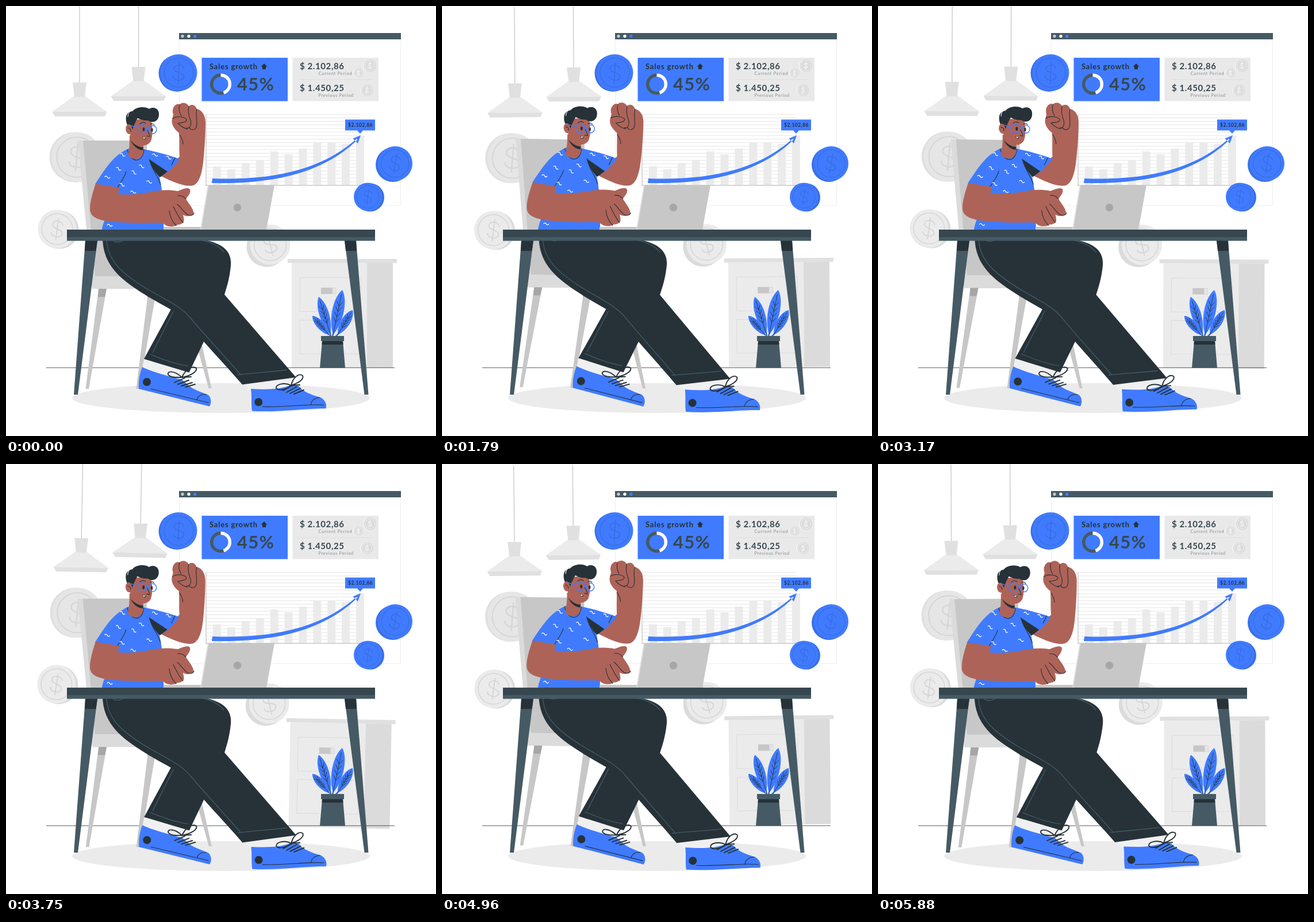
Recreate the animation shown at these times as an HTML page. Size 748 by 748 pixels, loop 5930 ms.

```html
<!DOCTYPE html>
<html lang="en">
<head>
<meta charset="utf-8">
<title>Sales growth</title>
<style>
html, body { margin: 0; width: 100%; height: 100%; overflow: hidden; background: #fff; }
svg { display: block; width: 100vw; height: 100vh; }
text { font-family: Lato, "Open Sans", sans-serif; font-weight: 700; fill: #263238; }
.blue { fill: #407bff; }
.dark { fill: #263238; }
.slate { fill: #455a64; }
.skin { fill: #ae6358; }
.pale { fill: #ebebeb; }
.light { fill: #e0e0e0; }
.mid { fill: #dbdbdb; }
.grey { fill: #c7c7c7; }
.line { fill: none; stroke: #263238; stroke-width: 1.1; stroke-linecap: round; stroke-linejoin: round; }
.seam { fill: none; stroke: #455a64; stroke-width: 1.3; stroke-linecap: round; }
.lace { fill: none; stroke: #263238; stroke-width: 1.9; stroke-linecap: round; stroke-linejoin: round; }
.sum { font-size: 15px; letter-spacing: .6px; fill: #37474f; }
.small { font-size: 7.5px; font-weight: 400; fill: #8b8b8b; }
</style>
</head>
<body>
<svg viewBox="0 0 748 748" xmlns="http://www.w3.org/2000/svg">
  <g id="room">
    <g id="lamps"></g>
    <g id="greyCoins"></g>
    <g id="cabinet">
      <path class="pale" d="M497 447H628V629.5H497Z"/>
      <path class="mid" d="M628 447H673V629.5H628Z"/>
      <path class="light" d="M490 440H680V447H490Z"/>
      <path d="M511 472.500H617V531.500H511ZM511 546.500H617V605H511Z" fill="none" stroke="#dbdbdb"/>
      <path class="grey" d="M548 490H568V501H548Z"/>
      <path d="M568 490.500H574V500.500H568Z" fill="#e6e6e6" stroke="#d5d5d5"/>
    </g>
  </g>

  <path d="M70 629.200H676" stroke="#263238" stroke-width=".8"/>
  <ellipse class="pale" cx="374" cy="682" rx="259" ry="26"/>

  <g id="board">
    <path d="M301.500 58V347H686.500V58" fill="none" stroke="#ebebeb" stroke-width=".9"/>
    <path class="slate" d="M301 47H687V58H301Z"/>
    <circle class="grey" cx="307" cy="52.500" r="2.700"/>
    <circle fill="#fff" cx="318" cy="52.500" r="2.700"/>
    <circle class="blue" cx="328.700" cy="52.500" r="2.700"/>
    <path class="blue" d="M340.500 90H490V165.500H340.500Z"/>
    <text x="354" y="110" font-size="13" letter-spacing=".8">Sales growth</text>
    <path class="dark" d="M449 100L454.500 105.500H452V110H446V105.500H443.500Z"/>
    <g fill="none" stroke-width="5.500">
      <circle cx="373.500" cy="136" r="15.800" stroke="#455a64"/>
      <path d="M373.500 120.200A15.800 15.800 0 0 1 378.500 151" stroke="#fff"/>
    </g>
    <text x="402" y="147" font-size="31" letter-spacing="1.300" style="fill:#37474f">45%</text>
    <path fill="#e9e9e9" d="M498.500 90H648V165.500H498.500Z"/>
    <path d="M511 128H637" stroke="#d8d8d8" stroke-width=".8"/>
    <text class="sum" x="511" y="109.500">$ 2.102,86</text>
    <text class="sum" x="511" y="148">$ 1.450,25</text>
    <text class="small" x="543.500" y="120" letter-spacing=".75">Current Period</text>
    <text class="small" x="543.500" y="157.500" letter-spacing=".65">Previous Period</text>
    <g id="miniCoins"></g>
    <g id="chart"></g>
    <path d="M348 188V312H626" fill="none" stroke="#c7c7c7" stroke-width="1.300"/>
    <path class="blue" d="M359 300C462 304 548 286 610 231L611.500 232.500C552 291 464 310 358 308ZM617 225L603.500 230.500L612 239Z"/>
    <path class="blue" d="M590 197.500H642V216.500H621L616 222L611 216.500H590Z"/>
    <text x="595" y="210" font-size="8.500" letter-spacing=".5">$2.102,86</text>
  </g>
  <g id="blueCoins"></g>

  <g id="person">
    <g id="chair">
      <path class="mid" d="M125 234H230V492H150Z"/>
      <path class="grey" d="M134 234H245V470H155Z"/>
      <path class="mid" d="M148 470H290V492H150Z"/>
      <path class="grey" d="M161 492H175L144 666H138.500ZM248 492H262L232 666H226.500ZM318 540H330L357.500 665H352.500Z"/>
      <path fill="#a6a6a6" d="M161 492H175L172 506H160ZM248 492H262L260 507H246Z"/>
    </g>

    <g id="shoes">
      <path fill="#f0f0f0" d="M240 614L318 637L312 660L236 636ZM411 656L498 645L502 664L426 670Z"/>
      <path class="blue" d="M237 628C232 640 230 655 231 666L354 696.500C358 690 357 680 351 676C338 671 326 667 319 661L306 650C288 645 255 637 237 628Z"/>
      <path class="blue" d="M426 666C428 680 426 692 428 704.500C470 707 520 700 556.500 700C559 692 554 684 547 681C530 676 517 671 509 661L497 659C475 668 450 667 426 666Z"/>
      <circle class="dark" cx="245" cy="654" r="7"/>
      <circle class="dark" cx="439.300" cy="689" r="7"/>
      <path class="line" d="M252 666L352 690M332 685C334 678 340 675 348 676M446 697C490 698 520 692 553 694M530 694C531 686 536 682 546 681"/>
      <path class="lace" d="M293 655L311 647M299 658L318 651M305 661L324 655M312 663L329 658M482 669L500 659M488 672L506 662M494 674L512 665M501 675L518 668"/>
      <path class="lace" d="M306 646C292 633 280 635 282 641C286 647 298 646 306 646C312 632 325 625 331 630C333 637 318 644 306 646L322 645M496 660C484 654 469 658 470 665C475 671 489 666 496 660C499 646 510 638 516 643C519 650 506 657 496 660L511 659"/>
    </g>

    <g id="trousers">
      <path class="dark" d="M290 522L240 614L318.500 637.500L345 582L330 540Z"/>
      <path class="seam" d="M291 531L255 603M251 606C272 615 295 623 316 626"/>
      <path class="dark" d="M168 400L345 407C372 412 394 424 391 452C389 475 383 492 380 502L504.500 646L411 658.500C378 620 343 585 321 556C304 533 274 523 240 501C202 477 167 452 168 400Z"/>
      <path class="seam" d="M175 408C177 444 203 466 242 490C275 510 305 522 322 544C350 577 381 610 408 641M403 641.500C433 638 462 636.500 488 633M342 408C360 411 373 420 379 428M185 408C192 412 199 411 204 407"/>
    </g>

    <g id="raisedArm">
      <path class="skin" d="M302 262C301 245 302 232 301 221C292 214 287 205 289 197L291 189C287 178 295 168 302 171C308 166 315 169 318 174C325 169 330 174 332 179C341 181 347 190 347 203C347 220 346 240 344 262C342 286 338 307 326 312C312 316 288 305 270 296L284 280Z"/>
      <path class="line" d="M290 196C296 191 309 192 314 197C315 203 304 203 299 204C304 209 309 213 316 214M302 172C300 179 302 186 305 191M318 175C316 183 318 191 321 199C323 207 320 214 314 212M332 180C329 189 334 202 331 211C328 217 322 216 319 212M302 224C306 230 308 235 308 240"/>
    </g>

    <g id="shirt">
      <path class="blue" d="M213 248C188 260 177 276 155 310L193 316C187 342 171 365 166 392H274C275 360 274 330 267 297C280 292 292 280 302 266C282 259 260 253 239 249Z"/>
      <path class="dark" d="M249.500 267L281 288L268 298C260 291 253 280 249.500 267Z"/>
      <path class="line" d="M249.500 267C254 286 264 294 269 311M209 288C206 299 199 307 194 316M211 250C217 274 238 274 240 250M294 264C291 271 290 273 288 277"/>
      <g id="print" fill="none" stroke="#fff" stroke-width="1.300" stroke-linecap="round"></g>
    </g>

    <g id="head">
      <path class="skin" d="M215 225H239V253C238 269 217 270 212 258C215 248 215 238 215 225Z"/>
      <path class="dark" d="M217 234C224 242 232 246 239 246L238 251C228 250 221 243 217 234Z"/>
      <path class="skin" d="M218 198L252 196C255 210 256 225 252 235C248 242 240 244 232 241.500C224 239 219 232 216 223C208 224 205 208 213 206Z"/>
      <path class="dark" d="M211 207C206 195 209 184 220 183C226 175 242 174 249 179C258 174 267 179 266 190C265 201 255 205 247 199C240 200 233 197 229 195C225 201 223 207 220 215C218 207 215 204 211 207Z"/>
      <path d="M212 193C212 187 215 183 219 182" fill="none" stroke="#fff"/>
      <g fill="none" stroke="#407bff" stroke-width="1.400">
        <circle cx="237" cy="214" r="8"/><circle cx="255" cy="215" r="7"/>
        <path d="M229 212L217 208M245 213C246 211 247 212 248 214"/>
      </g>
      <ellipse class="dark" cx="239.500" cy="214.500" rx="2" ry="3.300"/>
      <ellipse class="dark" cx="254" cy="215.500" rx="1.700" ry="3.100"/>
      <path class="line" d="M233 205C236 202 240 202 243 204M251 206C254 204 257 205 258 207M246 216C248 221 251 225 250 227L245 226M212 212C215 212 217 214 217 218"/>
      <path class="dark" d="M237 227C240 228.500 242 228.500 244 230C242 233 239 232.500 237 227Z"/>
      <path fill="#fff" d="M238 228L243 229.500L240 231Z"/>
    </g>

    <g id="nearArm">
      <path class="skin" d="M156 309C149 329 145 347 146.500 357C150 374 180 376 215 377C240 379 262 376 274 378C278 384 289 385 296 382C299 379 302 382 308 377C311 374 309 368 308 363C314 367 321 366 326 362C328 356 320 346 313 336C317 330 322 325 320 319C317 315 308 318 299 322C288 320 276 320 265 321C240 326 220 330 195 327L197 316Z"/>
      <path class="line" d="M284 356C285 367 290 376 296 382M291 349C297 360 302 371 308 377M298 345C306 351 308 358 316 363C322 366 327 363 327 360M313 336C309 331 304 329 299 330"/>
    </g>
  </g>

  <g id="laptop">
    <path class="grey" d="M274 385H342V390H274Z"/>
    <path d="M274 385H342" stroke="#a6a6a6" stroke-width=".8"/>
    <path class="mid" d="M351 312H357L344 389H338Z"/>
    <path class="grey" d="M353 311.500H467L453 389H340Z"/>
    <circle cx="402.500" cy="350.500" r="6.700" fill="#a6a6a6"/>
  </g>

  <g id="desk">
    <path class="slate" d="M138 408H159L125 676H118ZM589 408H609L630.500 676H623.500Z"/>
    <path class="dark" d="M138 408H159L156.500 426H137ZM589 408H609L610 426H591Z"/>
    <path class="slate" d="M106 389H642V408.500H106Z"/>
    <path fill="#37474f" d="M106 389H642V402H106Z"/>
  </g>

  <g id="plant">
    <g id="leaves"></g>
    <path class="slate" d="M550 583H586L590 629.500H546Z"/>
    <path class="dark" d="M550 583H586L586.500 589H549.500Z"/>
    <path class="slate" d="M548 574H588V583H548Z"/>
  </g>
</svg>
<script>
const byId = id => document.getElementById(id);
const fill = (id, html) => { byId(id).innerHTML = html; };

const lamp = (x, y) => `<g transform="translate(${x} ${y})">
  <path d="M0 0V${-y}" stroke="#c7c7c7" stroke-width="1.3"/>
  <path class="pale" d="M-10 24H10L47.500 51H-48Z"/>
  <path class="light" d="M-12 0H12L9 25H-9ZM-48 51H47.500L44 59H-43Z"/></g>`;
fill('lamps', lamp(128, 133) + lamp(230.5, 106));

const dollar = (x, y, h, tilt, color, w) => `<path
  transform="translate(${x} ${y}) rotate(${tilt}) scale(${h / 40})" fill="none" stroke="${color}"
  stroke-width="${w * 40 / h}" stroke-linecap="round"
  d="M10-9C8-18-10-18-10-8C-10 2 11-2 11 8C11 18-10 18-11 8M0-21V21"/>`;

// The rim is a second disc, moved by (dx, dy) behind the face.
const coin = (x, y, r, dx, dy, tilt, [face, rim, mark]) =>
  `<circle cx="${x + dx}" cy="${y + dy}" r="${r}" fill="${rim}"/>
   <circle cx="${x}" cy="${y}" r="${r}" fill="${face}"/>
   <circle cx="${x}" cy="${y}" r="${r * .8}" fill="none" stroke="${mark}" stroke-width="${r * .045}"/>` +
  dollar(x, y, r * 1.05, tilt, mark, r * .055);

const grey = ['#ebebeb', '#dbdbdb', '#d6d6d6'];
const blue = ['#407bff', '#3a70e8', '#396ee4'];
fill('greyCoins',
  coin(123, 263, 43.5, -4, 0, 5, ['#e6e6e6', '#e0e0e0', '#d6d6d6']) +
  coin(89, 388, 33.5, 4, 1, 8, grey) + coin(459.5, 415, 35, -6, 4, -14, grey));
fill('blueCoins',
  coin(300.5, 116, 32, -3, 1, 3, blue) + coin(677, 274, 30, -4, 2, 10, blue) +
  coin(629.5, 332, 24.5, 4, 1, 8, blue));

const mini = (x, y, r) => `<circle cx="${x - 1}" cy="${y}" r="${r}" fill="#fff"/>
  <circle cx="${x}" cy="${y}" r="${r}" fill="#dbdbdb"/>
  <circle cx="${x}" cy="${y}" r="${r * .78}" fill="none" stroke="#f5f5f5" stroke-width=".8"/>` +
  dollar(x, y, r * 1.05, 5, '#f8f8f8', 1);
fill('miniCoins', mini(633, 104, 11) + mini(613, 116.5, 8.5) + mini(628, 146.5, 10.5));

let chart = '';
for (let y = 188.5; y < 308; y += 6.15) chart += `<path d="M348 ${y}H616" stroke="#e4e4e4" stroke-width=".9"/>`;
[279, 284, 273, 269, 253, 258, 248, 237, 237, 240, 225].forEach((top, i) => {
  chart += `<rect class="pale" x="${360 + i * 24.9}" y="${top}" width="14" height="${311 - top}"/>`;
});
fill('chart', chart);

const squiggles = [[199, 257, 25], [172, 297, 10], [192, 281, 30], [219, 287, 35], [232, 277, 25], [198, 309, 25],
  [217, 323, 10], [245, 305, 15], [255, 258, 15], [279, 262, 25], [176, 381, 5]];
fill('print', squiggles.map(([x, y, a]) =>
  `<path transform="translate(${x} ${y}) rotate(${a})" d="M0 0q2.200-3 4.400 0t4.400 0"/>`).join(''));

// A leaf from its foot to its tip, with a midrib and paired veins.
function leaf(x, y, tipX, tipY, w) {
  const len = Math.hypot(tipX - x, tipY - y);
  const turn = Math.atan2(tipY - y, tipX - x) * 180 / Math.PI;
  let veins = `M-4 0H${len * .9}`;
  for (let i = 1; i < 5; i++) {
    const p = len * (.16 + i * .12), s = w * .3;
    veins += `M${p} 0L${p + 8} ${-s}M${p} 0L${p + 8} ${s}`;
  }
  return `<g transform="translate(${x} ${y}) rotate(${turn})">
    <path class="blue" d="M0 0C${len * .3} ${-w * .75} ${len * .8} ${-w * .75} ${len} 0C${len * .8} ${w * .75} ${len * .3} ${w * .75} 0 0Z"/>
    <path d="${veins}" fill="none" stroke="#263238" stroke-width=".8"/></g>`;
}
fill('leaves', `<path d="M565 575L563 560M568 575L571 558M573 575L580 568" stroke="#407bff" stroke-width="2"/>` +
  leaf(563, 573, 533, 539, 12) + leaf(577, 572, 603, 529, 14) +
  leaf(564, 570, 544, 506, 15) + leaf(569, 572, 585, 494, 18));

const LOOP = 5930, FPS = 24, LAST = 141;

// One degree each way, in straight ramps.
function sway(sec, period, peak, trough) {
  const p = sec / period % 1;
  if (p < peak) return p / peak;
  if (p < trough) return 1 - 2 * (p - peak) / (trough - peak);
  return (p - 1) / (1 - trough);
}
const turn = (id, angle, x, y) => byId(id).setAttribute('transform', `rotate(${angle} ${x} ${y})`);

function draw() {
  const t = performance.now() % LOOP;
  const sec = Math.min(LAST, Math.floor(t * FPS / 1000 + .1)) / FPS;
  turn('room', sway(sec, 3, .25, .75), 368, 315);
  turn('person', sway(sec, 1.5, .23, .73), 341, 437);
  requestAnimationFrame(draw);
}
draw();
</script>
</body>
</html>
```
